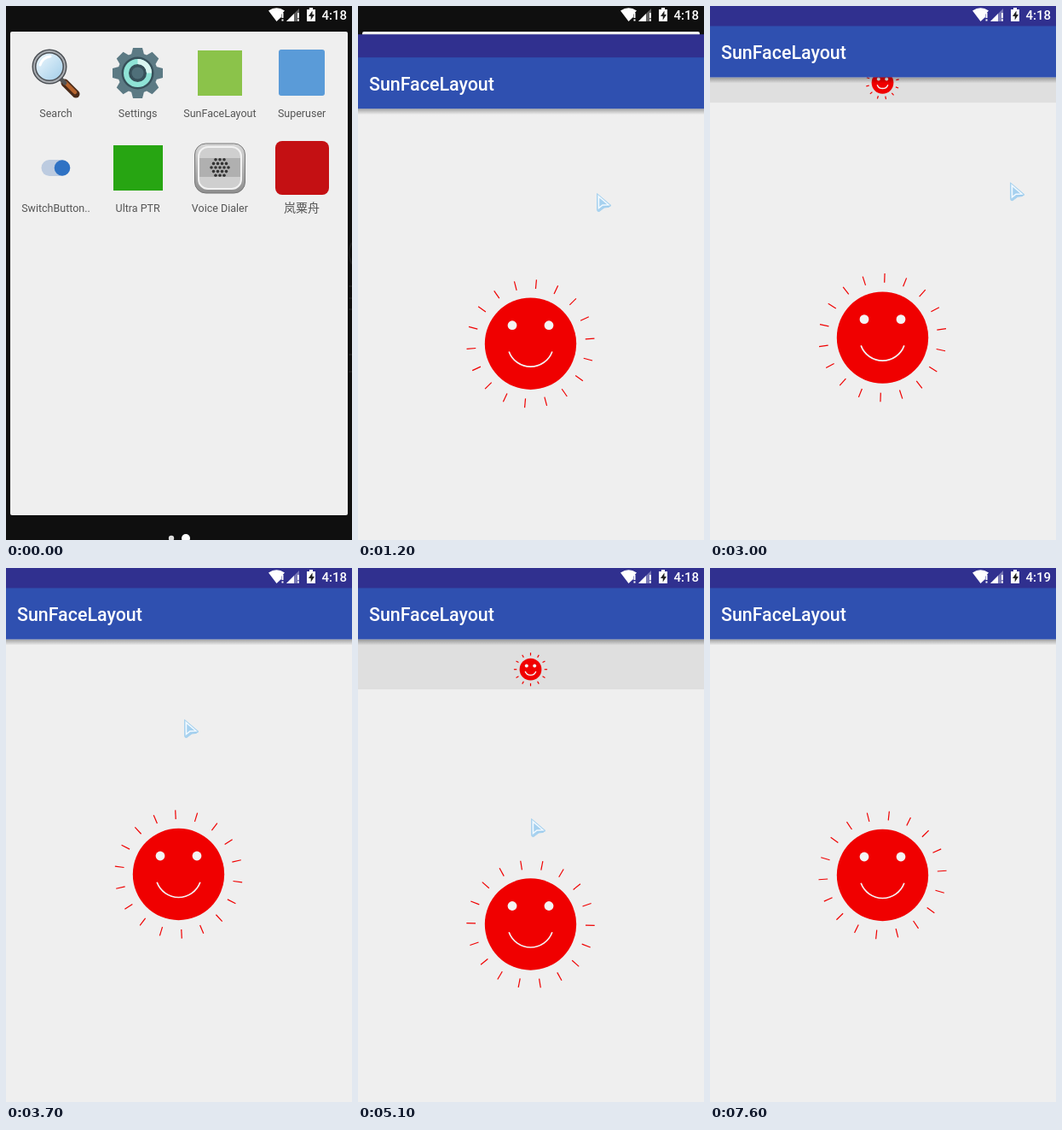
Recreate the animation shown at these times as an HTML page. Size 406 by 625 pixels, loop 7.65 s.

```html
<!DOCTYPE html>
<html lang="en">
<head>
<meta charset="utf-8">
<title>SunFaceLayout</title>
<style>
html, body { margin: 0; width: 100%; height: 100%; overflow: hidden; background: #0f0f0f; }
svg { display: block; width: 406px; height: 625px; }
text { font-family: Roboto, "Noto Sans CJK SC", "Noto Sans CJK", sans-serif; }
.label { font-size: 12.5px; fill: #555; text-anchor: middle; }
</style>
</head>
<body>
<svg viewBox="0 0 406 625" xmlns="http://www.w3.org/2000/svg">
  <defs>
    <linearGradient id="shade" x2="0" y2="1">
      <stop offset="0" stop-color="#000" stop-opacity=".32"/>
      <stop offset=".5" stop-color="#000" stop-opacity=".16"/>
      <stop offset="1" stop-color="#000" stop-opacity="0"/>
    </linearGradient>
    <linearGradient id="metal" x2="0" y2="1">
      <stop offset="0" stop-color="#d8d8d8"/>
      <stop offset="1" stop-color="#8e8e8e"/>
    </linearGradient>
    <linearGradient id="glass" x2="1" y2="1">
      <stop offset="0" stop-color="#f4fbff"/>
      <stop offset="1" stop-color="#9dcbe8"/>
    </linearGradient>
    <linearGradient id="arrow" x2="1" y2="1">
      <stop offset="0" stop-color="#cfe8f8"/>
      <stop offset="1" stop-color="#86bfe8"/>
    </linearGradient>
  </defs>

  <g id="launcher">
    <rect width="406" height="625" fill="#0f0f0f"/>
    <g fill="none" stroke="#1d1d1d" stroke-width="2">
      <path d="M406 277Q399 289 406 302M402 328h4M402 342h4M402 355h4M402 408h4M402 428h4"/>
    </g>
    <rect x="5" y="30" width="396" height="566" rx="2" fill="#efefef"/>
    <circle cx="194" cy="623" r="3.2" fill="#ddd"/>
    <circle cx="211" cy="623" r="5" fill="#fff"/>

    <g stroke-linecap="round">
      <path d="M69 90L82 103" stroke="#4a2a18" stroke-width="9"/>
      <path d="M70 90L81 101" stroke="#b5642e" stroke-width="4.5"/>
      <path d="M64 85L69 90" stroke="#555" stroke-width="5"/>
      <circle cx="51" cy="71" r="18" fill="url(#glass)" stroke="#4b4f54" stroke-width="5"/>
      <circle cx="51" cy="71" r="18" fill="none" stroke="#a9adb2" stroke-width="2"/>
      <path d="M40 69Q43 60 52 59" fill="none" stroke="#fff" stroke-width="3"/>
    </g>

    <g transform="translate(154.5 78.5)">
      <g id="teeth" fill="#5c7a84"></g>
      <circle r="23.5" fill="#5c7a84"/>
      <circle r="19" fill="#37505a"/>
      <circle r="13.5" fill="none" stroke="#8fe3d6" stroke-width="6"/>
      <path d="M0 -13.5A13.5 13.5 0 0 1 13.5 0" fill="none" stroke="#d9f6f1" stroke-width="6"/>
      <circle r="7" fill="#4f6f79"/>
    </g>

    <rect x="225" y="52" width="52" height="53" fill="#8bc34a"/>
    <rect x="320" y="51" width="54" height="54" rx="3" fill="#5a9bd8"/>
    <rect x="41.5" y="180" width="33" height="19" rx="9.5" fill="#bccbe0"/>
    <circle cx="66" cy="189.500" r="9.300" fill="#2f72c4"/>
    <rect x="126" y="163" width="58" height="53" fill="#27a512"/>
    <rect x="316" y="158" width="63" height="63" rx="8" fill="#c41013"/>

    <rect x="221.500" y="161" width="59" height="58" rx="13" fill="url(#metal)" stroke="#777"/>
    <rect x="226" y="165" width="50" height="49" rx="11" fill="#cfcfcf" stroke="#f2f2f2" stroke-width="2"/>
    <path d="M227 178h48v22h-48z" fill="#b0b0b0"/>
    <g id="holes" fill="#333"></g>

    <g id="labels"></g>
  </g>

  <g id="app">
    <rect y="20" width="406" height="610" fill="#efefef"/>
    <rect id="header" y="83.5" width="406" fill="#dfdfdf"/>
    <g id="small"></g>
    <g id="big"></g>
    <rect y="83.500" width="406" height="7" fill="url(#shade)"/>
    <rect y="-3.500" width="406" height="28" fill="#30308f"/>
    <rect y="23.500" width="406" height="60" fill="#2f50b0"/>
    <text x="13" y="62" font-size="21.4" font-weight="500" fill="#fff">SunFaceLayout</text>
  </g>

  <g fill="#fff">
    <path d="M308 5.500Q317.500 -1 327 5.500L323 10V13L317.500 18Z"/>
    <path d="M329 18L344 3V18Z" opacity=".35"/>
    <path d="M329 18L338 9V18Z"/>
    <path d="M323.500 8h2v6h-2zM323.500 15.500h2v2h-2zM342 8h2v6h-2zM342 15.500h2v2h-2z"/>
    <path d="M353 4h3v-2h4v2h3v14h-10z"/>
    <path d="M359.500 5.500L355 12h2.700v4.500L362 10h-2.500z" fill="#222"/>
    <text id="clock" x="400" y="16.300" font-size="15" font-weight="500" text-anchor="end">4:18</text>
  </g>

  <g id="cursor">
    <path d="M.5 .5L17 14.500Q15 17 9 17L3 21.500Q.5 22 .5 19Z" fill="url(#arrow)" stroke="#a9d2ee"/>
    <path d="M2.500 4V17.500L7 14L14 13.800Z" fill="#a6d1ef" stroke="#f3faff" stroke-width="1.500"/>
  </g>
</svg>
<script>
const LOOP = 7650, STEP = 50, TOP = 83.5;
const $ = id => document.getElementById(id);
const range = n => [...Array(n).keys()];
const move = (el, x, y) => el.setAttribute("transform", `translate(${x} ${y})`);
const show = (el, on) => el.setAttribute("visibility", on ? "visible" : "hidden");

// Value of column c at time t, linear between rows [time, value, ...].
function at(rows, t, c = 1) {
  const i = rows.findIndex(r => r[0] > t);
  if (i === 0) return rows[0][c];
  if (i < 0) return rows[rows.length - 1][c];
  const a = rows[i - 1], b = rows[i];
  return a[c] + (b[c] - a[c]) * (t - a[0]) / (b[0] - a[0]);
}

const pull = [[1350, 0], [1650, 54], [2400, 54], [3250, 19.5], [3700, 0], [4050, 0],
  [4400, 59.5], [4850, 47], [5100, 58.5], [5400, 65.5], [5700, 65.5], [5950, 54],
  [6200, 54], [6450, 45.2], [7250, 15.5], [7600, 1]];
const slide = [[1100, 50], [1200, 36.7], [1300, 10], [1400, 0]];
const fade = [[1100, 0], [1200, 1]];
const spin = [[0, -126.2], [1200, 5.3], [2150, 110.7], [3700, 277.1], [5100, 431],
  [6450, 581.2], [7600, 706]];
const smallSpin = [[0, -217], [2150, 18.5], [5100, 330], [6450, 463], [7650, 594]];
const pointer = [[150, 164, 194], [500, 259, 75], [850, 259, 75], [1200, 280, 219],
  [1350, 280, 219], [1650, 290, 325], [2150, 313, 235], [2300, 388, 230], [2450, 352, 220],
  [3250, 352, 200], [3700, 209, 177], [4050, 209, 177], [4400, 207, 295], [4850, 205, 271],
  [5100, 203, 293], [5400, 206, 307], [5650, 317, 307], [6200, 330, 340]];

function buildSun(el, o) {
  const mx = o.mouth * Math.cos(Math.PI / 9), my = o.mouth * Math.sin(Math.PI / 9);
  const rays = range(o.rays).map(i =>
    `<path d="M0 ${-o.from}V${-o.to}" transform="rotate(${i * 360 / o.rays})"/>`).join("");
  el.innerHTML = `<g class="rays" stroke="#f00000" stroke-width="${o.line}">${rays}</g>
    <circle r="${o.r}" fill="#f00000"/>
    <g fill="#f4f4f4"><circle cx="${-o.ex}" cy="${o.ey}" r="${o.er}"/><circle cx="${o.ex}" cy="${o.ey}" r="${o.er}"/></g>
    <path d="M${-mx} ${my}A${o.mouth} ${o.mouth} 0 0 0 ${mx} ${my}" fill="none" stroke="#f4f4f4" stroke-width="${o.smile}"/>`;
}

function placeSun(el, y, angle) {
  move(el, 202.5, y);
  el.querySelector(".rays").setAttribute("transform", `rotate(${angle})`);
}

buildSun($("big"), { r: 53.7, rays: 18, from: 64.5, to: 75.2, line: 1.2,
  ex: 21.5, ey: -21.5, er: 5.4, mouth: 27, smile: 1.7 });
buildSun($("small"), { r: 12.9, rays: 12, from: 16.2, to: 19.6, line: 1.2,
  ex: 4.7, ey: -4.3, er: 2, mouth: 6.7, smile: 1.4 });

$("teeth").innerHTML = range(8).map(i =>
  `<path d="M-8 -20L-5.500 -29.500H5.500L8 -20Z" transform="rotate(${i * 45})"/>`).join("");
$("holes").innerHTML = [3, 4, 5, 4, 3].map((n, row) => range(n).map(i =>
  `<circle cx="${251 + (i - (n - 1) / 2) * 5}" cy="${189 + (row - 2) * 4.6}" r="1.8"/>`).join("")).join("");
$("labels").innerHTML = ["Search", "Settings", "SunFaceLayout", "Superuser",
  "SwitchButton..", "Ultra PTR", "Voice Dialer", "岚粟舟"].map((s, i) =>
  `<text class="label" x="${58.5 + i % 4 * 96.2}" y="${i < 4 ? 130 : 241}"${i === 7 ? ' style="font-size:14px"' : ""}>${s}</text>`).join("");

function draw(t) {
  const s = at(pull, t);
  const open = t >= 1150;
  show($("app"), open);
  $("app").setAttribute("opacity", at(fade, t));
  move($("app"), 0, at(slide, t));
  $("header").setAttribute("height", s);
  show($("small"), open && s > 0);
  placeSun($("small"), TOP + s - 23.3, at(smallSpin, t));
  placeSun($("big"), 358.5 + s, at(spin, t));
  $("clock").textContent = t < 6000 ? "4:18" : "4:19";
  show($("cursor"), t >= 50 && t < 6250);
  move($("cursor"), at(pointer, t), at(pointer, t, 2));
}

const start = performance.now();
function tick() {
  const t = (performance.now() - start) % LOOP;
  draw(Math.floor(t / STEP) * STEP);
  requestAnimationFrame(tick);
}
tick();
</script>
</body>
</html>
```
